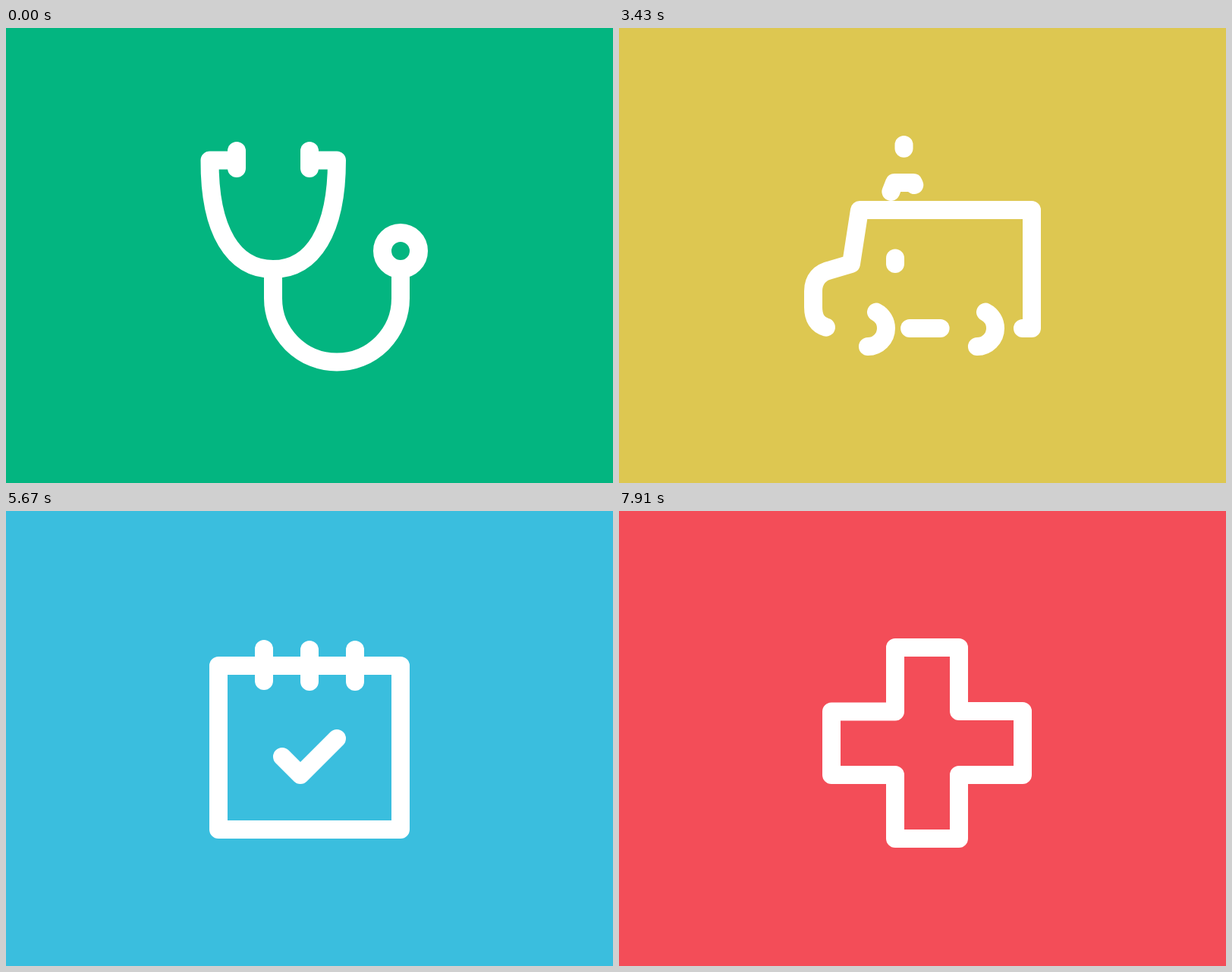
An HTML page with a canvas for the animation above (8 s loop, 800 by 600 pixels).

```html
<!DOCTYPE html>
<html lang="en">
<head>
<meta charset="utf-8">
<title>Medical icons</title>
<style>
  html, body { margin: 0; width: 100%; height: 100%; overflow: hidden; }
  canvas { display: block; }
</style>
</head>
<body>
<canvas id="stage" width="800" height="600"></canvas>
<script>
const LOOP = 8000, STEP = 70, LAST = 7910;
const ctx = document.getElementById('stage').getContext('2d');

const clamp = x => Math.max(0, Math.min(1, x));
const easeOut = x => 1 - (1 - x) ** 2;
const easeInOut = x => (1 - Math.cos(Math.PI * x)) / 2;

function measure(d) {
  const el = document.createElementNS('http://www.w3.org/2000/svg', 'path');
  el.setAttribute('d', d);
  return el.getTotalLength();
}

// outMs: how long the stroke takes to vanish; mid: the point on it that vanishes last.
// inAt, inMs: delay and duration of drawing; ease: how it is drawn.
function stroke(d, outMs, mid = 0.5, inAt = 0, inMs = 800, ease = easeOut) {
  return { path: new Path2D(d), length: measure(d), outMs, mid, inAt, inMs, ease };
}

function circle(x, y, r, dx, dy) {
  const px = dx * r, py = dy * r;
  return `M${x + px} ${y + py}a${r} ${r} 0 0 1 ${-2 * px} ${-2 * py}` +
         `a${r} ${r} 0 0 1 ${2 * px} ${2 * py}z`;
}

const stethoscope = [
  stroke('M304 174.5H268.5C268 268 300 318 352 318', 530, 0.55),
  stroke('M400 174.5H436C436 268 404 318 352 318', 530, 0.49),
  stroke('M304 162V185', 200),
  stroke('M400 162V185', 200),
  stroke('M352 318V356.5A84 84 0 0 0 520 356.5V320', 530),
  stroke(circle(520, 294, 24, 0, 1), 444, 0.44)
];

const ambulance = [
  stroke('M304 396H284Q256 396 256 368V347C256 331 265 322 279 319L306 311L317 240H544V396H496',
    530, 0.46, 0, 900),
  stroke(circle(328, 396, 24, -1, 0), 200, 0.56, 150, 850),
  stroke(circle(472, 396, 24, -1, 0), 200, 0.56, 250, 850),
  stroke('M352 396H448', 200, 0.56, 250, 650),
  stroke('M304 312H364V240', 130, 0.49, 300, 600),
  stroke('M349 240L363 204H388L403 240', 195, 0.42, 400, 550),
  stroke('M325.5 165.5L342.5 182.5', 112, 0.5, 740, 380),
  stroke('M375.5 144V168', 155, 0.52, 780, 380),
  stroke('M426.5 165.5L409.5 182.5', 112, 0.5, 820, 340)
];

const calendar = [
  stroke('M280 204H520V420H280Z', 427, 0.494, 0, 860),
  stroke('M340 182V224', 200, 0.5, 130, 380),
  stroke('M400 183V225', 200, 0.5, 150, 380),
  stroke('M460 183V225', 200, 0.5, 170, 360),
  stroke('M364 324L388 348L436 300', 367, 0.45, 420, 440, easeInOut)
];

const cross = [
  stroke('M364 180H448V264H532V348H448V432H364V348H280V264.5H364Z', 530, 0.5, 0, 740)
];

const scenes = [
  { color: [3, 181, 128], strokes: stethoscope, start: -2000, end: 800 },
  { color: [221, 199, 81], strokes: ambulance, start: 1500, end: 3320 },
  { color: [58, 190, 222], strokes: calendar, start: 4020, end: 5840 },
  { color: [243, 77, 88], strokes: cross, start: 6540, end: 9000 }
];

function background(t) {
  let color = scenes[0].color;
  for (let i = 1; i < scenes.length; i++) {
    const k = clamp((t - scenes[i - 1].end - 180) / 350);
    color = color.map((c, j) => c + (scenes[i].color[j] - c) * k);
  }
  return `rgb(${color.map(Math.round).join(',')})`;
}

function drawStroke(s, from, to) {
  if (to - from < 0.001) return;
  if (from === 0 && to === 1) {
    ctx.setLineDash([]);
  } else {
    ctx.setLineDash([(to - from) * s.length, s.length * 2]);
    ctx.lineDashOffset = -from * s.length;
  }
  ctx.stroke(s.path);
}

function render(t) {
  ctx.fillStyle = background(t);
  ctx.fillRect(0, 0, 800, 600);
  ctx.strokeStyle = '#fff';
  ctx.lineWidth = 24;
  ctx.lineCap = ctx.lineJoin = 'round';
  for (const scene of scenes) {
    for (const s of scene.strokes) {
      const drawn = s.ease(clamp((t - scene.start - s.inAt) / s.inMs));
      const gone = easeInOut(clamp((t - scene.end) / s.outMs));
      drawStroke(s, s.mid * gone, Math.min(drawn, 1 - (1 - s.mid) * gone));
    }
  }
}

const began = performance.now();
function tick() {
  const t = (performance.now() - began) % LOOP;
  render(Math.min(LAST, Math.floor(t / STEP) * STEP));
  requestAnimationFrame(tick);
}
tick();
</script>
</body>
</html>
```
